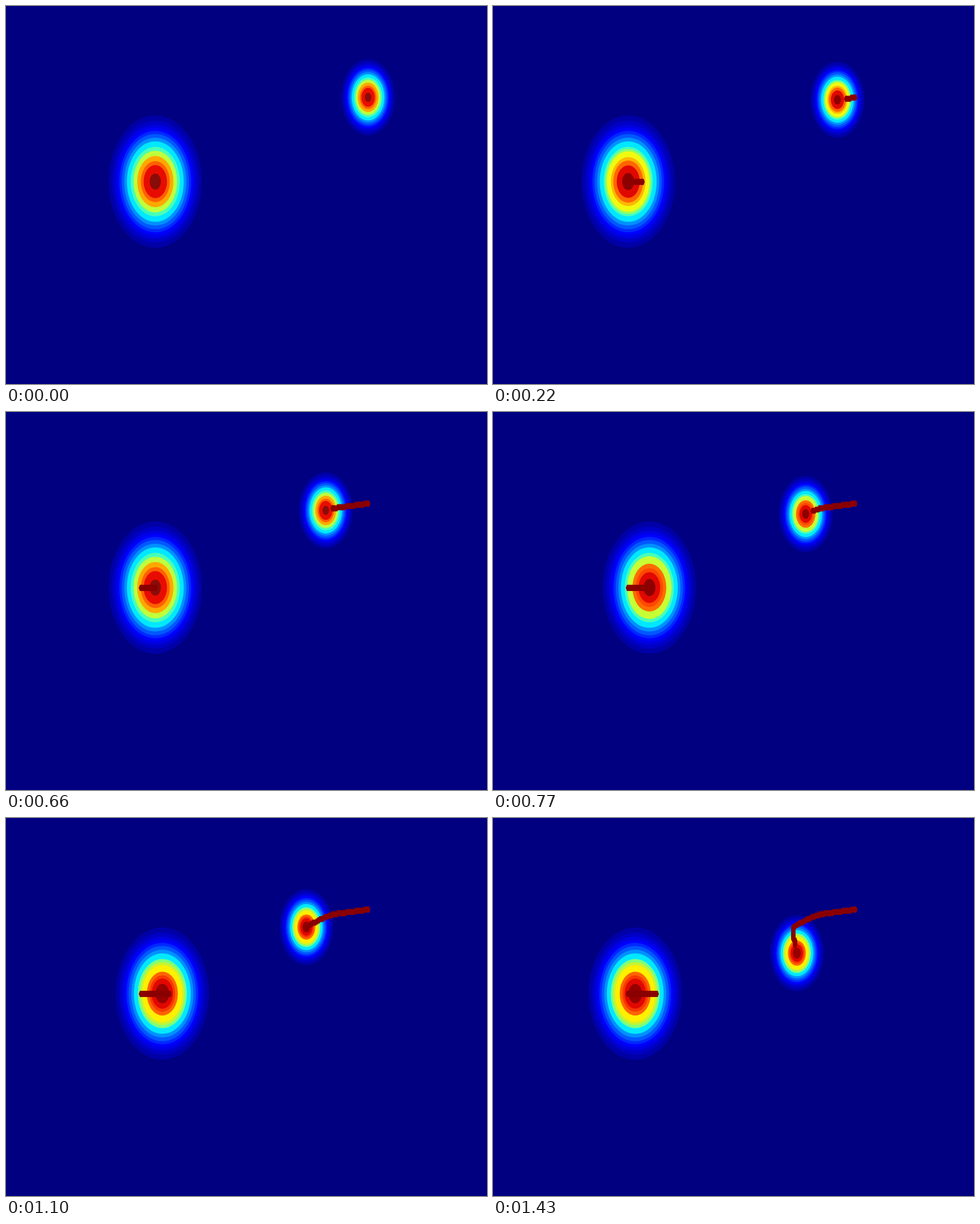
Recreate the animation shown at these times as an HTML page with a canvas. Size 844 px wide and 663 px high, loop 1540 ms.

```html
<!DOCTYPE html>
<html lang="en">
<head>
<meta charset="utf-8">
<title>Heat trails</title>
<style>
  html, body { margin: 0; width: 100%; height: 100%; overflow: hidden; background: #000080; }
  canvas { display: block; }
</style>
</head>
<body>
<canvas id="stage" width="844" height="663"></canvas>
<script>
const ctx = document.getElementById('stage').getContext('2d');
const STEP = 110, COUNT = 14;
const CELL_X = 3.095, CELL_Y = 2.075;
const ASPECT = 0.7075;

// Contour bands, outermost first: vertical radius and colour.
const cool = [
  [116, '#0000a6'], [107, '#0000c4'], [100, '#0000e2'], [94, '#0000ff'],
  [89, '#0028ff'], [83.5, '#0058ff'], [77, '#0090ff'], [70.5, '#00e8ff'],
  [61, '#48ffb8']
];
const warm = [
  [[54, '#c0ff3c'], [45, '#ffa800'], [36, '#ff6000'], [29, '#e80c00'], [14, '#8a0c08']],
  [[57, '#90ff68'], [53, '#f0fa10'], [43, '#ffb800'], [37, '#ff6600'], [28.5, '#e00800'], [15, '#8c0000']],
  [[55, '#c8ff34'], [42, '#ff6c00'], [34, '#ff4800'], [27, '#e00800'], [15, '#8c0000']],
  [[60, '#80ff78'], [55, '#c8f430'], [50, '#fff000'], [38.5, '#ff6400'], [32, '#f83800'], [26.5, '#e00800'], [17, '#960000']]
];
const bandsAt = k => cool.concat(warm[+'01111102223333'[k]]);

// Visit corners in straight runs of n samples; shared corners are held twice.
function walk(corners, n) {
  return Array.from({ length: COUNT }, (_, k) => {
    const i = Math.floor(k / n), t = (k % n) / (n - 1);
    return corners[i].map((v, j) => Math.floor(v + (corners[i + 1][j] - v) * t));
  });
}

const blobs = [
  { x: 262, y: 308, size: 1, path: walk([[0, 0], [-8, 0], [0, 0], [8, 0], [0, 0], [-8, 0]], 3) },
  { x: 527, y: 160.2, size: 0.575, path: walk([[35, 0], [15, 4], [0, 15], [3, 45]], 5) }
];

function drawBlob(b, k, bands) {
  const [cx, cy] = b.path[k];
  for (const [r, color] of bands) {
    ctx.fillStyle = color;
    ctx.beginPath();
    ctx.ellipse(b.x + cx * CELL_X, b.y + cy * CELL_Y,
      r * b.size * ASPECT, r * b.size, 0, 0, 2 * Math.PI);
    ctx.fill();
  }
}

function stamp(x, y) {
  ctx.beginPath();
  for (const [dx, dy] of [[-4, 0], [-2, -5.2], [2, -5.2], [4, 0], [2, 5.2], [-2, 5.2]])
    ctx.lineTo(x + dx, y + dy);
  ctx.fill();
}

function drawTrail(b, k) {
  ctx.fillStyle = '#8a0000';
  for (let i = 0; i < k; i++) {
    const [x0, y0] = b.path[Math.max(0, i - 1)], [x1, y1] = b.path[i];
    const n = Math.max(Math.abs(x1 - x0), Math.abs(y1 - y0), 1);
    for (let j = 0; j <= n; j++)
      stamp(b.x + Math.round(x0 + (x1 - x0) * j / n) * CELL_X,
            b.y + Math.round(y0 + (y1 - y0) * j / n) * CELL_Y + 0.5);
  }
}

function draw(now) {
  const k = Math.floor(now / STEP) % COUNT;
  const bands = bandsAt(k);
  ctx.fillStyle = '#000080';
  ctx.fillRect(0, 0, 844, 663);
  for (const b of blobs) {
    drawBlob(b, k, bands);
    drawTrail(b, k);
  }
}

const start = performance.now();
function tick() {
  draw(performance.now() - start);
  requestAnimationFrame(tick);
}
tick();
</script>
</body>
</html>
```
